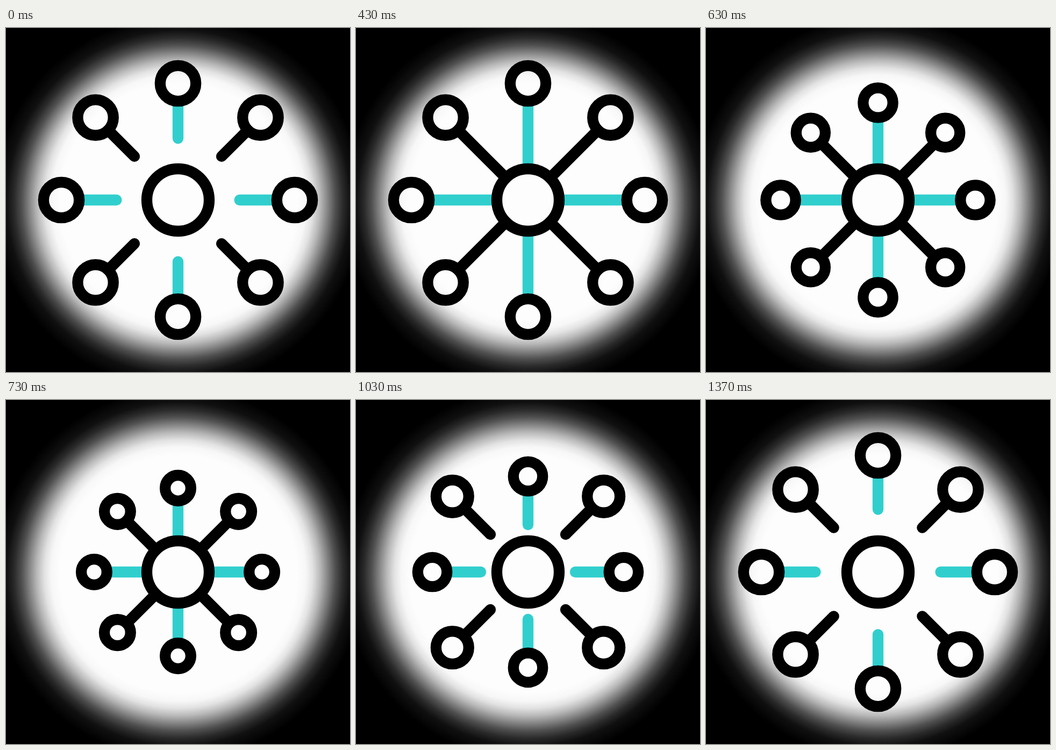
Animation, 640 px wide and 640 px high, one loop 1.67 s. Source, as an HTML page:

```html
<!DOCTYPE html>
<html lang="en">
<head>
<meta charset="utf-8">
<title>Hub and nodes</title>
<style>
  html, body { margin: 0; width: 100%; height: 100%; overflow: hidden; background: #000; }
  svg {
    display: block; width: 100vw; height: 100vh;
    background: radial-gradient(circle at 50.15% 50.6%,
      #fdfdfd 34.5vmin, #f7f7f7 37vmin, #e2e2e2 39vmin, #b8b8b8 41.2vmin,
      #848484 43.4vmin, #505050 45.6vmin, #2a2a2a 47.8vmin, #101010 50vmin, #000 54vmin);
  }
  circle, line { fill: none; stroke: #000; stroke-width: 20.3; stroke-linecap: round; }
  .teal { stroke: #30cfcd; }
</style>
</head>
<body>
<svg viewBox="0 0 640 640"><g id="hub" transform="translate(320 320)"></g></svg>
<script>
const LOOP = 1670, REACH = 217, RADIUS = 33.2;
const hub = document.getElementById('hub');

// Monotone cubic curve through [step, value] points.
function curve(points) {
  const n = points.length - 1;
  const slope = i => (points[i + 1][1] - points[i][1]) / (points[i + 1][0] - points[i][0]);
  const tangent = points.map((_, i) => {
    if (i === 0 || i === n) return 0;
    const a = slope(i - 1), b = slope(i);
    return a * b <= 0 ? 0 : 2 * a * b / (a + b);
  });
  return x => {
    if (x <= points[0][0]) return points[0][1];
    if (x >= points[n][0]) return points[n][1];
    let i = 0;
    while (x > points[i + 1][0]) i++;
    const [x0, y0] = points[i], [x1, y1] = points[i + 1];
    const h = x1 - x0, u = (x - x0) / h, v = 1 - u;
    return y0 * v * v * (1 + 2 * u) + y1 * u * u * (3 - 2 * u)
      + h * u * v * (tangent[i] * v - tangent[i + 1] * u);
  };
}

// scale: node distance and size; tip: inner end of the spoke.
const straight = {
  scale: curve([[13, 1], [16, .935], [19, .834], [24.5, .667], [26, .675], [31, .82], [34, .889], [41, 1]]),
  tip: curve([[-1.5, 116.5], [12.5, 58], [26, 58], [31, 88], [34, 99], [41, 116.5]])
};
const diagonal = {
  scale: curve([[13, 1], [19, .816], [22.4, .732], [26, .777], [31, .917], [34, .976], [39, 1]]),
  tip: curve([[-1.5, 116.5], [12.5, 58], [26, 58], [31, 99], [34, 111], [40, 116.5]])
};

function add(parent, tag, attrs) {
  const el = document.createElementNS('http://www.w3.org/2000/svg', tag);
  for (const key in attrs) el.setAttribute(key, attrs[key]);
  return parent.appendChild(el);
}

const arms = Array.from({ length: 8 }, (_, i) => {
  const g = add(hub, 'g', { transform: `rotate(${i * 45})` });
  return {
    motion: i % 2 ? diagonal : straight,
    spoke: add(g, 'line', { class: i % 2 ? '' : 'teal' }),
    ring: add(g, 'circle', {})
  };
});
add(hub, 'circle', { r: 58 });

function draw(ms) {
  // 30 steps a second, on a 10 ms clock
  const step = Math.floor((Math.floor(ms % LOOP / 10) + .5) * .3);
  for (const { motion, spoke, ring } of arms) {
    const s = motion.scale(step);
    ring.setAttribute('cx', REACH * s);
    ring.setAttribute('r', RADIUS * s);
    spoke.setAttribute('x1', (REACH - RADIUS) * s);
    spoke.setAttribute('x2', motion.tip(step));
  }
}

const start = performance.now();
function tick() {
  draw(performance.now() - start);
  requestAnimationFrame(tick);
}
tick();
</script>
</body>
</html>
```
